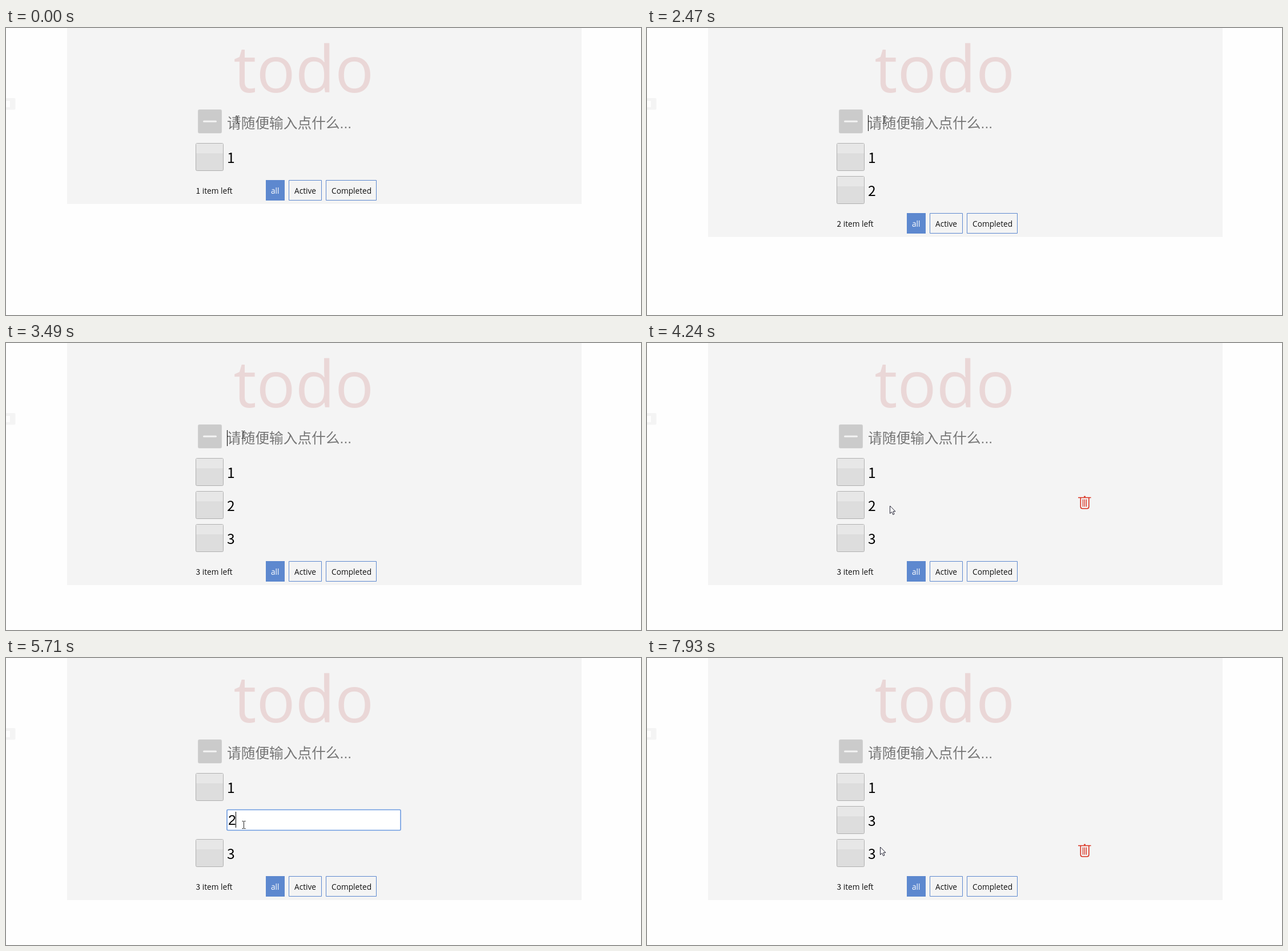
Write an HTML page with a canvas that moves like this. It is 1112 by 504 pixels and loops after 7990 ms.

```html
<!DOCTYPE html>
<html lang="zh">
<head>
<meta charset="utf-8">
<title>todo</title>
<style>
html, body { margin: 0; width: 100%; height: 100%; overflow: hidden; background: #fefefe; }
canvas { display: block; }
</style>
</head>
<body>
<canvas id="stage" width="1112" height="504"></canvas>
<script>
const ctx = document.getElementById('stage').getContext('2d');
const LOOP = 7990;
const ROW = 58;
const BLUE = '#5d88cf';
const LATIN = '"Open Sans", "Noto Sans", sans-serif';
const CJK = '"Noto Sans CJK SC", "Noto Sans CJK", sans-serif';
const INPUT = '"Liberation Sans", Arial, sans-serif';

// Pointer keys: time, x, y
const path = [
  [0, 405, 161], [809, 405, 161], [880, 415, 161], [4010, 415, 161],
  [4110, 420, 222], [4180, 424, 266], [4240, 425, 286], [4340, 424, 290],
  [4520, 412, 290], [4690, 399, 290], [5500, 399, 290], [5710, 416, 293],
  [7700, 416, 293], [7780, 414, 303], [7850, 411, 320], [7930, 408, 332]
];

// Blinking caret: intervals when it is visible
const caretOn = [[1270, 1730], [1880, 2380], [2470, 3430], [3490, 4020], [4550, 5000],
  [5470, 6020], [6550, 7540]];

const within = (t, a, b) => t >= a && t < b;

function pointerAt(t) {
  let i = 0;
  while (i < path.length - 1 && path[i + 1][0] <= t) i++;
  const a = path[i], b = path[i + 1] || a;
  const k = b === a ? 0 : (t - a[0]) / (b[0] - a[0]);
  return [Math.round(a[1] + (b[1] - a[1]) * k), Math.round(a[2] + (b[2] - a[2]) * k)];
}

function stateAt(t) {
  const items = ['1'];
  if (t >= 2470) items.push(t >= 7570 ? '3' : '2');
  if (t >= 3490) items.push('3');
  return {
    items,
    typed: within(t, 1880, 2470) ? '2' : within(t, 2900, 3490) ? '3' : '',
    editing: within(t, 5470, 7570),
    draft: t < 6700 ? '2' : t < 6980 ? '' : '3',
    caret: caretOn.some(([a, b]) => within(t, a, b)),
    pointer: pointerAt(t)
  };
}

function rect(x, y, w, h, color) {
  ctx.fillStyle = color;
  ctx.fillRect(x, y, w, h);
}

function rounded(x, y, w, h, r, fill, stroke, width = 1) {
  ctx.beginPath();
  ctx.roundRect(x, y, w, h, r);
  if (fill) { ctx.fillStyle = fill; ctx.fill(); }
  if (stroke) { ctx.strokeStyle = stroke; ctx.lineWidth = width; ctx.stroke(); }
}

function text(str, x, y, size, family, color) {
  ctx.font = size + 'px ' + family;
  ctx.fillStyle = color;
  ctx.fillText(str, x, y);
}

function lines(segments, color, width) {
  ctx.beginPath();
  for (const [x1, y1, x2, y2] of segments) {
    ctx.moveTo(x1, y1);
    ctx.lineTo(x2, y2);
  }
  ctx.strokeStyle = color;
  ctx.lineWidth = width;
  ctx.stroke();
}

function backdrop(count) {
  rect(0, 0, 1112, 504, '#fefefe');
  rect(107, 0, 901, 251 + count * ROW, '#f4f4f4');
  rounded(-4, 123, 20.5, 20.5, 2, '#f4f4f4');
  rect(0, 128, 7, 11, '#fefefe');
  text('todo', 398.5, 113, 113, LATIN, '#ead7d7');
}

function inputBar(s) {
  rounded(336.5, 143.5, 41, 41, 2, '#cbcbcb', '#d0d0d0');
  rounded(345, 162.5, 24, 3, 1.5, '#f4f4f4');
  if (s.typed) {
    text(s.typed, 387, 175, 24.7, INPUT, '#000');
  } else {
    text('请随便输入点什么', 387, 175.5, 24.7, CJK, '#757575');
    text('...', 584.6, 175.5, 24.7, INPUT, '#757575');
  }
  if (s.caret && !s.editing) rect(s.typed ? 401 : 387, 153, 1, 28, '#000');
}

function checkbox(y) {
  rounded(332.5, y + 0.5, 48, 48, 2, '#dddddd', '#b0b0b0');
  rect(333, y + 1, 47, 17, '#e7e7e7');
}

function editor(s) {
  rounded(387, 266.5, 304, 36, 1.5, '#fff', '#6b9ae0', 1.6);
  text(s.draft, 389, 293, 24.7, INPUT, '#000');
  if (s.caret) rect(s.draft ? 402 : 389, 270, 1, 28, '#000');
}

function trash(y) {
  const c = '#d9301f';
  ctx.beginPath();
  ctx.moveTo(759.3, y + 3);
  ctx.lineTo(759.3, y + 18.5);
  ctx.quadraticCurveTo(759.3, y + 21.7, 762.3, y + 21.7);
  ctx.lineTo(770.8, y + 21.7);
  ctx.quadraticCurveTo(773.8, y + 21.7, 773.8, y + 18.5);
  ctx.lineTo(773.8, y + 3);
  ctx.strokeStyle = c;
  ctx.lineWidth = 1.6;
  ctx.stroke();
  lines([[755, y + 2.5, 777.5, y + 2.5], [765, y + 0.6, 768, y + 0.6]], c, 1.6);
  lines([763.5, 766.5, 769.5].map(x => [x, y + 5.5, x, y + 18.5]), c, 1.3);
}

function list(s) {
  const hovered = Math.floor((s.pointer[1] - 197) / ROW);
  s.items.forEach((label, i) => {
    const y = 202 + i * ROW;
    if (s.editing && i === 1) return editor(s);
    checkbox(y);
    text(label, 387, y + 35, 24.7, CJK, '#000');
    if (i === hovered) trash(y + 9);
  });
}

function footer(count) {
  const y = 209 + count * ROW;
  const base = y + 23.5;
  text(count, 332.5, base, 13.7, CJK, '#111');
  text(' item left', 340.2, base, 13.7, LATIN, '#111');
  rect(455, y, 33, 36, BLUE);
  text('all', 464, base, 13.7, LATIN, '#fff');
  for (const [label, x, w] of [['Active', 495.5, 57], ['Completed', 560.5, 88]]) {
    rounded(x, y + 0.5, w, 35, 0, null, BLUE);
    text(label, x + 9.5, base, 13.7, LATIN, '#111');
  }
}

function beam(x, y) {
  const cx = x + 0.5;
  lines([[cx, y - 6, cx, y + 6],
    [x - 2.5, y - 6.5, x, y - 6.5], [x + 1, y - 6.5, x + 3.5, y - 6.5],
    [x - 2.5, y + 6.5, x, y + 6.5], [x + 1, y + 6.5, x + 3.5, y + 6.5]], '#222', 1);
}

function arrow(x, y) {
  const shape = [[0, 0], [0, 13.5], [3.1, 10.6], [5.3, 15.4], [7.5, 14.4], [5.4, 9.8], [9.5, 9.8]];
  ctx.beginPath();
  for (const [dx, dy] of shape) ctx.lineTo(x + 0.5 + dx, y + dy);
  ctx.closePath();
  ctx.fillStyle = '#fff';
  ctx.fill();
  ctx.strokeStyle = '#222233';
  ctx.lineWidth = 1;
  ctx.stroke();
}

function pointer(s) {
  const [x, y] = s.pointer;
  const overText = y < 186 || x < 402 || s.editing;
  (overText ? beam : arrow)(x, y);
}

function draw(now) {
  const s = stateAt(now % LOOP);
  backdrop(s.items.length);
  inputBar(s);
  list(s);
  footer(s.items.length);
  pointer(s);
  requestAnimationFrame(draw);
}
requestAnimationFrame(draw);
</script>
</body>
</html>
```
